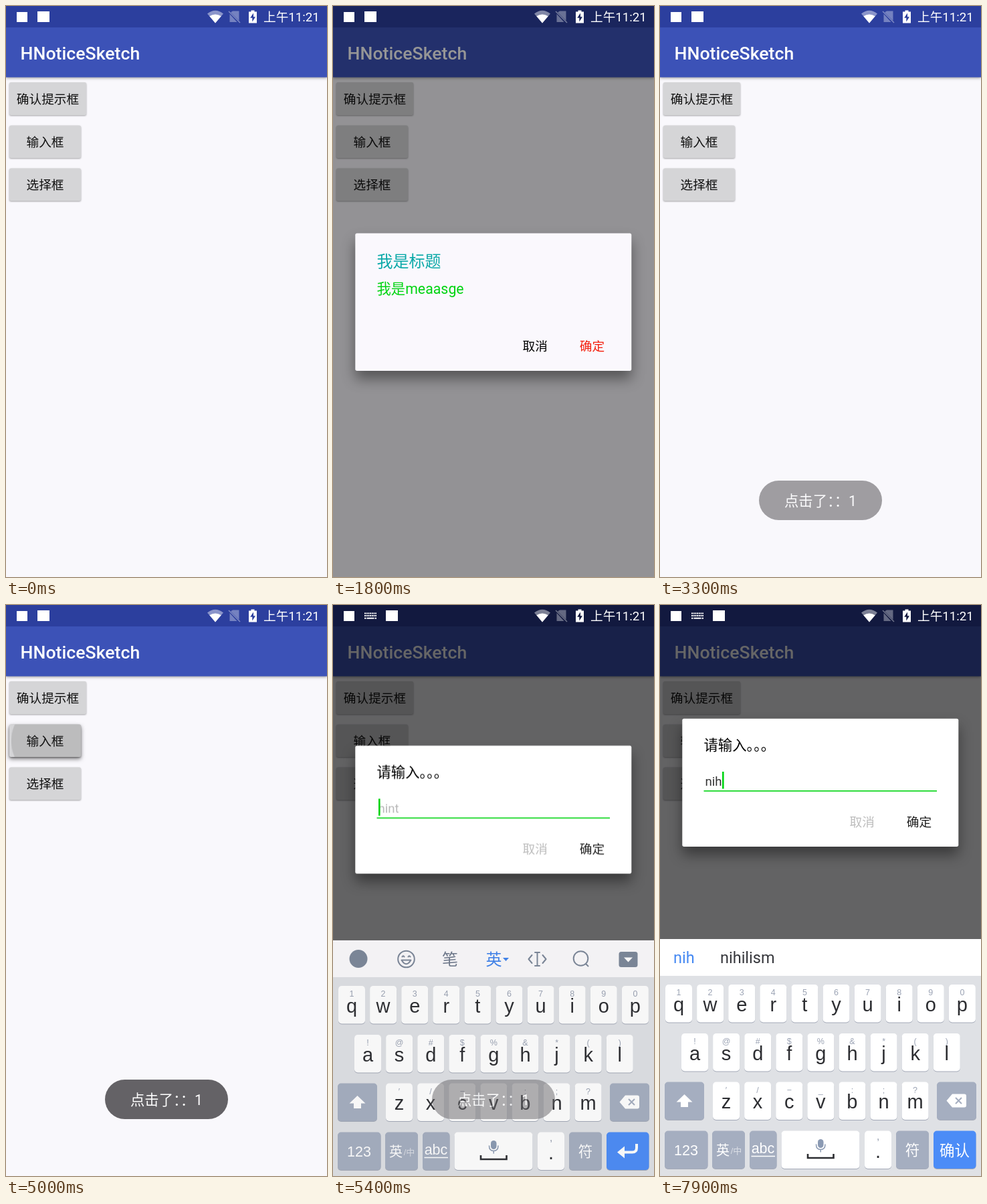
Write an HTML page that moves like this. It is 480x853 px and loops after 8 s.

```html
<!DOCTYPE html>
<html lang="zh-CN">
<head>
<meta charset="utf-8">
<title>Dialogs</title>
<style>
html, body { margin: 0; width: 100%; height: 100%; overflow: hidden; background: #f9f8fc; }
svg { display: block; width: 100%; height: 100%; }
text { font: 18.67px Roboto, "Noto Sans CJK SC", "Noto Sans CJK", sans-serif; }
.title { font-size: 26.67px; font-weight: 500; }
.big { font-size: 21.33px; }
.word { font-size: 23.5px; }
.mid { text-anchor: middle; }
.cap, .sub, .fn { text-anchor: middle; font-family: "Liberation Sans", "Noto Sans CJK SC", "Noto Sans CJK", sans-serif; }
.cap { font-size: 29px; fill: #2c2d31; }
.sub { font-size: 12.5px; fill: #9ba3b4; }
.fn { font-size: 21.5px; fill: #fff; }
.btn { fill: #d5d5d7; filter: drop-shadow(0 1px 1.2px rgba(0,0,0,.35)); }
.box { filter: drop-shadow(0 12px 10px rgba(0,0,0,.42)); }
.caps { filter: drop-shadow(0 1.6px 0 #a3a9b7); }
.line { fill: none; stroke: #7c8799; stroke-width: 2; stroke-linecap: round; stroke-linejoin: round; }

.bar { filter: drop-shadow(0 1.5px 2px rgba(0,0,0,.4)); }
.ripple, .lift { opacity: 0; }
.ripple { transform-box: fill-box; transform-origin: center; animation: ripple 8s linear infinite; }
.lift { filter: drop-shadow(0 3px 3px rgba(0,0,0,.5)); animation: lift 8s linear infinite; }
.first { animation-delay: 1.4s; }
.second { animation-delay: 4.8s; }
.dim { animation: dim 8s linear infinite; }
.confirm { transform-origin: 240px 442px; animation: confirm 8s linear infinite; }
.prompt { animation: prompt 8s linear infinite; }
.board { animation: board 8s linear infinite; }
.toast { animation: toast 8s linear infinite; }
.shift { animation: shift 8s step-end infinite; }
.ime { animation: ime 8s step-end infinite; }
.caret { animation: caret 8s step-end infinite, blink 8s step-end infinite; }
.idle { animation: idle 8s step-end infinite; }
.typed { animation: typed 8s step-end infinite; }
.one { animation: one 8s step-end infinite; }
.two { animation: two 8s step-end infinite; }
.three { animation: three 8s step-end infinite; }
.key { fill: #fff; }
.press { animation: press 8s step-end infinite; }

@keyframes ripple {
  0% { opacity: .12; transform: scale(.2); }
  2.5% { opacity: .12; transform: scale(.97); }
  3% { opacity: .12; transform: scale(1.05); }
  4.8%, 100% { opacity: 0; transform: scale(1.05); }
}
@keyframes lift {
  0%, 5%, 100% { opacity: 0; }
  1.5%, 3% { opacity: 1; }
}
@keyframes dim {
  0%, 19.5% { opacity: 0; }
  22.5% { opacity: .41; }
  24.5%, 37.5% { opacity: .6; }
  38.75% { opacity: .55; }
  40% { opacity: .25; }
  41.25%, 63.2% { opacity: 0; }
  67.2%, 100% { opacity: .6; }
}
@keyframes confirm {
  0%, 19.8% { opacity: 0; transform: scale(.9); }
  21.25% { opacity: .85; transform: scale(.985); }
  22.3%, 37.8% { opacity: 1; transform: none; }
  38.75% { opacity: .8; transform: none; }
  40% { opacity: .2; transform: none; }
  40.8%, 100% { opacity: 0; transform: none; }
}
@keyframes prompt {
  0%, 63.4% { opacity: 0; transform: translateY(177px); }
  65% { opacity: 1; transform: translateY(177px); }
  66.25% { opacity: 1; transform: translateY(108px); }
  67.5% { opacity: 1; transform: translateY(40.7px); }
  68.75% { opacity: 1; transform: translateY(8px); }
  70%, 100% { opacity: 1; transform: none; }
}
@keyframes board {
  0%, 65% { opacity: 0; transform: translateY(70px); }
  66.25% { opacity: .6; transform: translateY(22px); }
  67.5% { opacity: .95; transform: translateY(2px); }
  68.3%, 100% { opacity: 1; transform: none; }
}
@keyframes toast {
  0%, 39.6% { opacity: 0; }
  41.25% { opacity: .6; }
  42.8%, 66% { opacity: 1; }
  67.5% { opacity: .5; }
  69%, 100% { opacity: 0; }
}
@keyframes shift { 0% { transform: none; } 66.25%, 100% { transform: translateX(32px); } }
@keyframes ime { 0% { opacity: 0; } 66.25%, 100% { opacity: 1; } }
@keyframes caret {
  0% { transform: none; }
  83.75% { transform: translateX(10.3px); }
  92.5% { transform: translateX(14.8px); }
  97.5%, 100% { transform: translateX(25px); }
}
@keyframes blink {
  0%, 81.25%, 92.5%, 100% { opacity: 1; }
  75%, 91.25% { opacity: 0; }
}
@keyframes idle { 0% { opacity: 1; } 83.75%, 100% { opacity: 0; } }
@keyframes typed { 0% { opacity: 0; } 83.75%, 100% { opacity: 1; } }
@keyframes one { 0%, 92.5%, 100% { opacity: 0; } 83.75% { opacity: 1; } }
@keyframes two { 0%, 97.5%, 100% { opacity: 0; } 92.5% { opacity: 1; } }
@keyframes three { 0% { opacity: 0; } 97.5%, 100% { opacity: 1; } }
@keyframes press { 0% { fill: #c6cbd5; } 1.8%, 100% { fill: #fff; } }
</style>
</head>
<body>
<svg viewBox="0 0 480 853" preserveAspectRatio="none">
  <defs>
    <clipPath id="c1"><rect x="5" y="114" width="115" height="49" rx="2.5"/></clipPath>
    <clipPath id="c2"><rect x="5" y="178.500" width="107" height="48.500" rx="2.5"/></clipPath>
  </defs>

  <!-- page -->
  <rect width="480" height="853" fill="#f9f8fc"/>
  <rect class="bar" y="32" width="480" height="74.500" fill="#3c52b7"/>
  <rect width="480" height="32" fill="#2c3f9e"/>
  <text class="title" x="21.500" y="79.500" fill="#fff">HNoticeSketch</text>
  <rect class="btn" x="5" y="114" width="115" height="49" rx="2.5"/>
  <rect class="btn" x="5" y="178.500" width="107" height="48.500" rx="2.5"/>
  <rect class="btn" x="5" y="242.500" width="107" height="48.500" rx="2.5"/>
  <rect class="lift first" x="5" y="114" width="115" height="49" rx="2.5" fill="#d5d5d7"/>
  <rect class="lift second" x="5" y="178.500" width="107" height="48.500" rx="2.5" fill="#d5d5d7"/>
  <g clip-path="url(#c1)"><circle class="ripple first" cx="62.500" cy="139" r="62"/></g>
  <g clip-path="url(#c2)"><circle class="ripple second" cx="66" cy="203" r="60"/></g>
  <g class="mid" fill="#111">
    <text x="62.500" y="146">确认提示框</text>
    <text x="58.500" y="210">输入框</text>
    <text x="58.500" y="274">选择框</text>
  </g>
  <rect class="dim" width="480" height="853"/>

  <!-- status icons -->
  <g fill="#fff">
    <rect x="16" y="9" width="16" height="15"/>
    <rect class="shift" x="47" y="8" width="18" height="16"/>
    <g class="ime">
      <path d="M47 12.500H65M47 16H65" stroke="#fff" stroke-width="2.200" stroke-dasharray="2 .7"/>
      <path d="M47 19.800H49.500M50.500 19.800H61.500M62.500 19.800H65" stroke="#fff" stroke-width="2"/>
    </g>
    <path d="M313 25.500L301 11.500Q313 2 325 11.500Z" opacity=".45"/>
    <path d="M313 25.500L304.300 15.300Q313 9.500 321.700 15.300Z"/>
    <path d="M339 7.500H348.500V22L336 9.500ZM334.500 12L345.500 24H334.500Z" opacity=".35"/>
    <path d="M333 8L350 25" stroke="#fff" stroke-width="1.500" opacity=".4"/>
    <path fill-rule="evenodd" d="M363 8.500H366.500V6.500H371.500V8.500H375V25.500H363ZM370 10.500L365.200 17.700H368.300V23.500L373 16.200H370Z"/>
    <text x="385" y="23">上午11:21</text>
  </g>

  <!-- confirm dialog -->
  <g class="confirm">
    <rect class="box" x="33.300" y="339.500" width="413" height="205.500" rx="2.700" fill="#faf8fd"/>
    <text x="65.500" y="389.500" fill="#0aa9a8" style="font-size:24px">我是标题</text>
    <text class="big" x="65.500" y="429.500" fill="#00d412">我是meaasge</text>
    <text x="283.500" y="515" fill="#000">取消</text>
    <text x="368.800" y="515" fill="#f4210f">确定</text>
  </g>

  <!-- input dialog -->
  <g class="prompt">
    <rect class="box" x="33.300" y="169.700" width="413" height="191.300" rx="2.700" fill="#fff"/>
    <text class="big" x="65.500" y="216.500" fill="#000">请输入。。。</text>
    <text class="idle" x="67.500" y="269.500" fill="#b9b9b9">hint</text>
    <g fill="#333">
      <text class="one" x="67.500" y="269.500">n</text>
      <text class="two" x="67.500" y="269.500">ni</text>
      <text class="three" x="67.500" y="269.500">nih</text>
    </g>
    <rect x="65.500" y="277" width="348.500" height="1.600" fill="#00d412"/>
    <rect class="caret" x="68" y="249" width="2.600" height="25.500" fill="#00d412"/>
    <text x="283.500" y="331" fill="#bdbdbd">取消</text>
    <text x="368.800" y="331" fill="#222">确定</text>
  </g>

  <!-- keyboard -->
  <g class="board">
    <rect y="499" width="480" height="430" fill="#dfe1e5"/>
    <rect y="499" width="480" height="55" fill="#fbfafc"/>
    <g class="idle">
      <circle cx="38" cy="526.500" r="13.500" fill="#7c8799"/>
      <g class="line">
        <circle cx="109.500" cy="527" r="12.300"/>
        <path d="M102.500 528.500Q109.500 540 116.500 528.500ZM103.500 523.500Q105 521 106.500 523.500M112.500 523.500Q114 521 115.500 523.500"/>
        <path d="M297.500 521L292.500 527L297.500 533M313.500 521L318.500 527L313.500 533M302 517H309M305.500 517V537M302 537H309"/>
        <circle cx="370.500" cy="526" r="10.800"/>
        <path d="M378.500 534.500L381.500 537.500"/>
      </g>
      <text class="mid" x="175" y="536" fill="#6f7a8d" style="font-size:24px">笔</text>
      <text class="mid" x="240.500" y="536" fill="#3f83ee" style="font-size:24px;font-weight:500">英</text>
      <path d="M254 525H263L258.500 530Z" fill="#3f83ee"/>
      <rect x="427.500" y="516" width="28" height="23" rx="3.500" fill="#7c8799"/>
      <path d="M435 524.500H448L441.500 531.500Z" fill="#fff"/>
    </g>
    <g class="typed"><rect y="499" width="480" height="55" fill="#fff"/></g>
    <g id="words"></g>

    <g class="caps" id="caps">
      <g fill="#a5aec0">
        <rect x="7" y="712.500" width="59" height="56.500" rx="5"/>
        <rect x="414" y="712.500" width="59" height="56.500" rx="5"/>
        <rect x="7" y="785.500" width="64.500" height="56.500" rx="5"/>
        <rect x="78" y="785.500" width="49" height="56.500" rx="5"/>
        <rect x="134" y="785.500" width="40.500" height="56.500" rx="5"/>
        <rect x="353" y="785.500" width="49" height="56.500" rx="5"/>
      </g>
      <rect class="key" x="181.500" y="785.500" width="117" height="56.500" rx="5"/>
      <rect class="key" x="306" y="785.500" width="40" height="56.500" rx="5"/>
      <rect x="409" y="785.500" width="63.500" height="56.500" rx="5" fill="#4b8cf7"/>
    </g>
    <g id="labels">
      <path d="M36.500 731L48.500 742.500H42V750H31V742.500H24.500Z" fill="#fff"/>
      <path d="M428.500 740.500L437 730.500H455Q458 730.500 458 733.500V747.500Q458 750.500 455 750.500H437Z" fill="#fff"/>
      <path d="M442 736L451 745M451 736L442 745" stroke="#a5aec0" stroke-width="2"/>
      <text class="fn" x="39" y="821.500">123</text>
      <text class="fn" x="94" y="821.500" style="font-size:20px">英</text>
      <text class="fn" x="114" y="820" style="font-size:13px" opacity=".6">/中</text>
      <text class="fn" x="154" y="818.500">abc</text>
      <path d="M136.500 823.500H172" stroke="#fff" stroke-width="1.500"/>
      <text class="fn" x="377.500" y="822">符</text>
      <rect x="236" y="798" width="8.500" height="13" rx="4.200" fill="#8b9ab3"/>
      <path d="M233.500 806Q233.500 813.500 240.200 813.500T247 806M240.200 813.500V817" class="line" style="stroke:#8b9ab3;stroke-width:1.500"/>
      <path d="M221 820V826H259.500V820" fill="none" stroke="#2c2d31" stroke-width="2.600"/>
      <text class="sub" x="326" y="799" style="font-size:17px">,</text>
      <text class="cap" x="326" y="826">.</text>
      <g class="idle">
        <path d="M454 803V809Q454 815.500 447.500 815.500H430" fill="none" stroke="#fff" stroke-width="4"/>
        <path d="M425 815.500L436 806.500V824.500Z" fill="#fff"/>
      </g>
      <text class="fn typed" x="440.500" y="822.500" style="font-size:22.500px">确认</text>
    </g>
  </g>

  <!-- toast -->
  <g class="toast">
    <rect x="148" y="709" width="184" height="59" rx="29.500" fill="#646266"/>
    <text class="big mid" x="240" y="746.500" fill="#fff">点击了：：1</text>
  </g>
</svg>
<script>
const $ = id => document.getElementById(id);

function add(parent, tag, attrs, text) {
  const node = document.createElementNS("http://www.w3.org/2000/svg", tag);
  for (const name in attrs) node.setAttribute(name, attrs[name]);
  if (text) node.textContent = text;
  parent.append(node);
}

const rows = [
  ["qwertyuiop", "1234567890", 8, 567],
  ["asdfghjkl", "!@#$%&*()", 32, 640],
  ["zxcvbnm", "′/−_:;?", 79, 712.5]
];
const presses = { n: 6.6, i: 7.3, h: 7.7 };

for (const [letters, marks, left, y] of rows) {
  [...letters].forEach((ch, i) => {
    const x = left + i * 47.1, at = presses[ch];
    add($("caps"), "rect", {
      class: at ? "key press" : "key", style: at ? `animation-delay:${at}s` : "",
      x, y, width: 40, height: 56.5, rx: 5
    });
    add($("labels"), "text", { class: "sub", x: x + 20, y: y + 16 }, marks[i]);
    add($("labels"), "text", { class: "cap", x: x + 20, y: y + 39.5 }, ch);
  });
}

const guesses = {
  one: [["n", 20], ["no", 72], ["not", 138], ["now", 212]],
  two: [["ni", 20], ["nice", 78], ["night", 160]],
  three: [["nih", 20], ["nihilism", 90]]
};
for (const step in guesses) {
  guesses[step].forEach(([word, x], i) =>
    add($("words"), "text", { class: "word " + step, x, y: 534.5, fill: i ? "#36373c" : "#4488f2" }, word));
}
</script>
</body>
</html>
```
